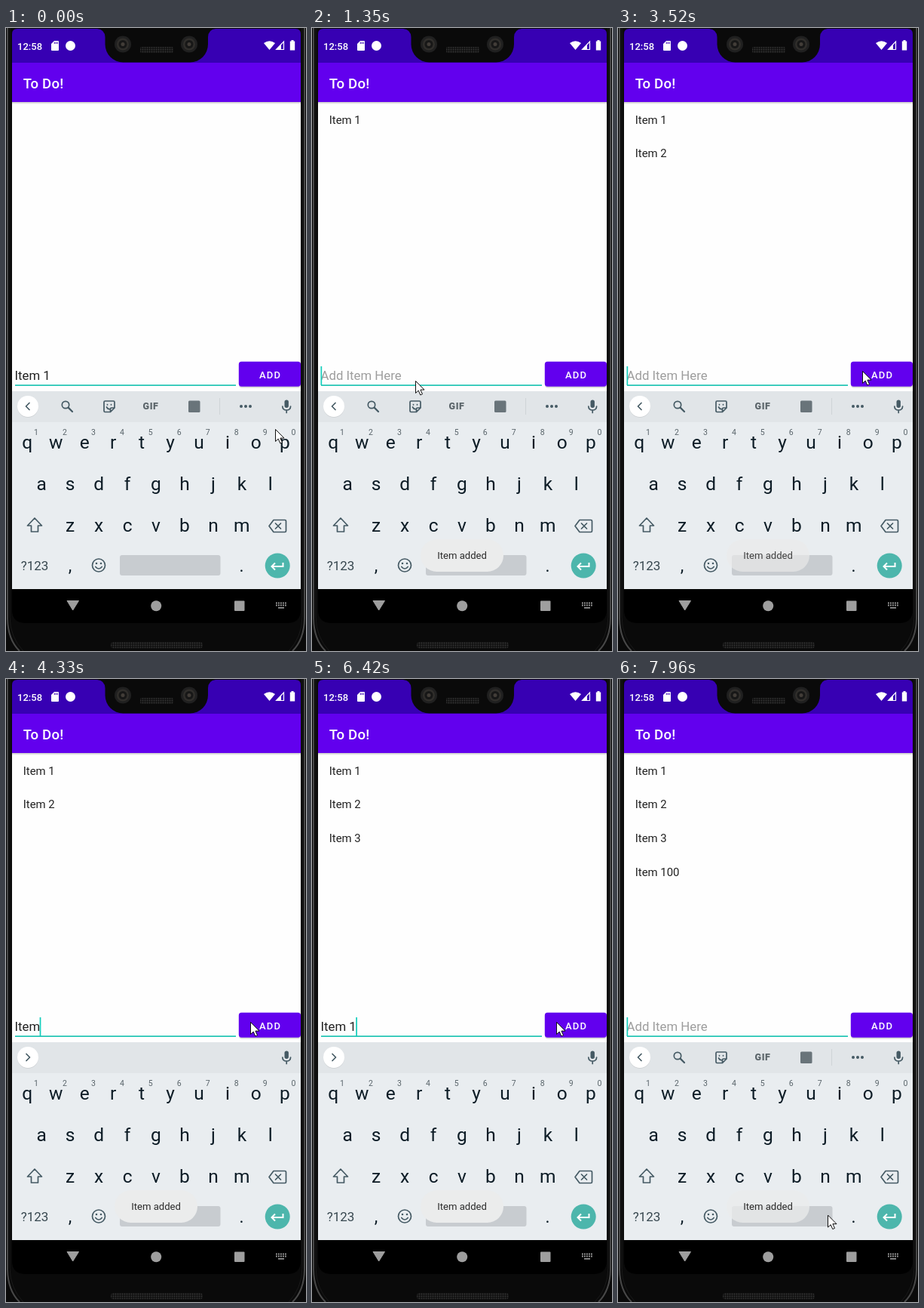
These frames come from a looping animation (398 px wide and 825 px high, 8000 ms). An HTML page:

```html
<!DOCTYPE html>
<html lang="en">
<head>
<meta charset="utf-8">
<title>To Do</title>
<style>
html, body { margin: 0; width: 100%; height: 100%; overflow: hidden; background: #0a0a0a; }
svg { display: block; width: 100%; height: 100%; }
text { font-family: Roboto, sans-serif; }
.mid { text-anchor: middle; }
.line { fill: none; stroke: #455a64; stroke-width: 1.7; stroke-linejoin: round; stroke-linecap: round; }
</style>
</head>
<body>
<svg viewBox="0 0 398 825">
  <defs>
    <linearGradient id="fade" x2="0" y2="1">
      <stop stop-color="#000" stop-opacity=".22"/><stop offset="1" stop-color="#000" stop-opacity="0"/>
    </linearGradient>
    <pattern id="mesh" width="3" height="3" patternUnits="userSpaceOnUse">
      <rect width="3" height="3" fill="#111"/><circle cx="1.5" cy="1.5" r=".9" fill="#333"/>
    </pattern>
  </defs>

  <!-- phone body -->
  <rect width="398" height="825" fill="#0a0a0a"/>
  <path d="M2 0V782Q2.500 810 18 825M396 0V782Q395.500 810 380 825" fill="none" stroke="#484848" stroke-width="2"/>
  <path d="M5 0V780Q5.500 807 23 825M393 0V780Q392.500 807 375 825" fill="none" stroke="#1a1a1a"/>
  <rect x="139" y="813" width="122" height="8.500" rx="4" fill="url(#mesh)"/>
  <path d="M8 743H391V770Q391 788 373 788H26Q8 788 8 770Z" fill="#000"/>

  <!-- app -->
  <rect x="8" y="98" width="383" height="384" fill="#fefefe"/>
  <path d="M8 47V8Q8 1 15 1H384Q391 1 391 8V47Z" fill="#3700b3"/>
  <rect x="8" y="46" width="383" height="52" fill="#6200ee"/>
  <rect x="8" y="98" width="383" height="3" fill="url(#fade)"/>
  <path d="M121 0V1Q131 2 131.500 12V21.500A24 24 0 0 0 155.500 45.500H244A24 24 0 0 0 268 21.500V12Q268.500 2 278 1V0Z" fill="#0a0a0a"/>
  <g id="lenses"></g>
  <rect x="178" y="25" width="44" height="8" rx="2" fill="url(#mesh)"/>
  <text x="15" y="28.500" font-size="13.030" font-weight="500" fill="#fff">12:58</text>
  <g fill="#fff">
    <path d="M64 17H69Q70 17 70 18V29Q70 30 69 30H61Q60 30 60 29V21Z"/>
    <path d="M64.300 18.500V21M66.300 18.500V21M68.300 18.500V21" stroke="#3700b3" stroke-width="1"/>
    <circle cx="85.500" cy="23.500" r="6.500"/>
    <path d="M342 20Q349.500 14.500 357 20L349.500 29Z"/>
    <path d="M368.500 18V28.500H358.500Z" fill="none" stroke="#fff" stroke-width="1.200"/>
    <path d="M365 21.500V29H358Z"/>
    <path d="M378.500 17.500V16H381.500V17.500H383.200V29.500H376.800V17.500Z"/>
  </g>
  <text x="22.800" y="79.500" font-size="18.600" font-weight="500" letter-spacing=".23" fill="#fff">To Do!</text>
  <g id="list"></g>
  <rect x="12" y="472.300" width="293" height="1.700" fill="#20c5b4"/>
  <text id="field" x="11.500" y="466" font-size="16.800"></text>
  <rect id="caret" y="448" width="1.700" height="25" fill="#12cdbb"/>
  <rect x="309" y="443.500" width="82" height="33" rx="4" fill="#000" opacity=".16"/>
  <rect x="308.800" y="441.800" width="82.200" height="33" rx="3.700" fill="#6200ee"/>
  <rect id="ripple" x="308.800" y="441.800" width="82.200" height="33" rx="3.700" fill="#fff"/>
  <text x="336" y="463.700" font-size="13.030" font-weight="500" letter-spacing="1.160" fill="#fff">ADD</text>

  <!-- keyboard -->
  <rect x="8" y="481" width="383" height="262" fill="#e9edf0"/>
  <rect x="8" y="481" width="383" height="41" fill="#e1e5e8"/>
  <circle cx="29" cy="501.800" r="14" fill="#000" opacity=".1"/>
  <circle cx="29" cy="501" r="14" fill="#fff"/>
  <path id="chevron" class="line" d="M31 496.500L26.500 501L31 505.500"/>
  <g id="tools">
    <g class="line">
      <circle cx="79" cy="499" r="4.700"/><path d="M82.600 502.600L88 508" stroke-width="2.200"/>
      <path d="M131.500 494H142.500Q144 494 144 495.500V503L138.500 508.500H131.500Q130 508.500 130 507V495.500Q130 494 131.500 494ZM144 503H140Q138.500 503 138.500 504.500V508.500M133.500 502Q135 505 137.500 504.500M134.500 498.500V499M139.500 498.500V499"/>
    </g>
    <text class="mid" x="192" y="505.200" font-size="12.500" font-weight="900" letter-spacing=".6" fill="#5a6469">GIF</text>
    <rect x="242" y="493.500" width="15.500" height="15.500" rx="1.500" fill="#69747a"/>
    <rect x="283" y="490" width="1" height="22" fill="#cfd4d7"/>
    <path d="M312 501h0M318 501h0M324 501h0" class="line" style="stroke-width:4"/>
  </g>
  <rect x="369.500" y="492.500" width="5.400" height="10.500" rx="2.700" fill="#455a64"/>
  <path class="line" d="M366.800 501Q367 506 372.200 506T377.600 501M372.200 506V509.500"/>
  <g id="keys" fill="#0d1c26"></g>
  <g class="line">
    <path d="M38 649L47.500 659H42.500V667H33.500V659H28.500Z"/>
    <path d="M355 651.500H370Q371.500 651.500 371.500 653V666Q371.500 667.500 370 667.500H355L349 659.500Z M357.500 656L364.500 663M364.500 656L357.500 663"/>
    <circle cx="123" cy="711.500" r="8.500"/>
    <path d="M118.800 713.500Q123 718.500 127.200 713.500"/>
    <path d="M120 709h0M126 709h0" stroke-width="2.600"/>
  </g>
  <text class="mid" x="38" y="718" font-size="17" fill="#37474f">?123</text>
  <rect x="151" y="698" width="133.500" height="27" rx="3" fill="#c8ccd0"/>
  <circle cx="360.200" cy="712" r="16.500" fill="#4db6ac"/>
  <path d="M367.500 708V713H353M357 708.500L352.500 713L357 717.500" fill="none" stroke="#fff" stroke-width="2"/>

  <!-- navigation bar -->
  <g fill="#9e9e9e">
    <path d="M81 758.500H96.500L88.700 771Z" stroke="#9e9e9e" stroke-linejoin="round"/>
    <circle cx="199.200" cy="765.300" r="7"/>
    <rect x="303" y="758.500" width="13.500" height="13.500" rx="1"/>
    <path d="M358 761.500H372M358 764.500H372" stroke="#9e9e9e" stroke-width="1.800" stroke-dasharray="1.800 1.200"/>
    <path d="M361 767.800H369" stroke="#9e9e9e" stroke-width="1.600"/>
  </g>

  <rect id="toast" x="144" y="677" width="110" height="43" rx="21.500" fill="#ebecec"/>
  <text id="note" class="mid" x="199" y="703" font-size="13.100" fill="#2b2b2b">Item added</text>
  <path id="pointer" d="M.5 .5V16.500L4.200 13.100L6.800 19L9.500 17.800L6.900 12.100H12Z" fill="#fff" stroke="#111" stroke-linejoin="round"/>
</svg>
<script>
const LOOP = 8000;
const $ = id => document.getElementById(id);

function add(parent, tag, attrs, content = '') {
  const el = document.createElementNS('http://www.w3.org/2000/svg', tag);
  for (const k in attrs) el.setAttribute(k, attrs[k]);
  el.textContent = content;
  return $(parent).appendChild(el);
}

for (const cx of [155, 243])
  [[11, '#202020'], [8, '#302e2b'], [5.5, '#171717'], [2.5, '#423d38']]
    .forEach(([r, fill]) => add('lenses', 'circle', { cx, cy: 21.5, r, fill }));

// every letter row is centred on the same axis
const AXIS = 199, KEY = 37.95;
['qwertyuiop', 'asdfghjkl', 'zxcvbnm'].forEach((row, r) =>
  [...row].forEach((ch, i) => {
    const x = AXIS + (i - (row.length - 1) / 2) * KEY;
    add('keys', 'text', { class: 'mid', x, y: 557 + r * 55, 'font-size': 24.5 }, ch);
    if (!r) add('keys', 'text', { class: 'mid', x: x + 11.8, y: 538.5, 'font-size': 10.5, fill: '#59646a' }, (i + 1) % 10);
  }));
for (const [ch, x] of [[',', 85], ['.', 312.5]])
  add('keys', 'text', { class: 'mid', x, y: 719.5, 'font-size': 23 }, ch);

// moments at which each list row appears
const added = [520, 3390, 5070, 7550];
const rows = ['Item 1', 'Item 2', 'Item 3', 'Item 100'].map((s, i) =>
  add('list', 'text', { x: 22.8, y: 126.5 + i * 44.8, 'font-size': 14.9, fill: '#222' }, s));

// bursts of screen updates: start, end, number of updates
const bursts = [
  [120, 1050, 8], [1200, 1350, 2], [1780, 2740, 7], [2860, 3790, 8], [3910, 4480, 5],
  [4910, 5570, 5], [5870, 6140, 3], [6420, 6870, 4], [7270, 7960, 6]
];
const ticks = [0];
for (const [a, b, n] of bursts)
  for (let i = 0; i < n; i++) ticks.push(Math.round((a + (b - a) * i / (n - 1)) / 10) * 10);

// time, field text, toolbar open, caret shown
const typing = [
  [0, 'Item 1', 1, 0], [520, '', 1, 1], [1200, '', 1, 0], [1350, '', 1, 1],
  [1780, 'I', 0, 1], [1940, 'Ite', 0, 1], [2100, 'Item ', 0, 1], [2260, 'Item 2', 0, 1], [2420, 'Item 2', 1, 0],
  [3390, '', 1, 1],
  [3910, 'I', 0, 1], [4050, 'Ite', 0, 1], [4190, 'Item ', 0, 1], [4330, 'Item 3', 0, 1], [4480, 'Item 3', 1, 0],
  [5070, '', 1, 1],
  [5870, 'I', 0, 1], [6000, 'Ite', 0, 1], [6140, 'Item', 0, 1],
  [6420, 'Item 1', 0, 1], [6570, 'Item 10', 0, 1], [6720, 'Item 100', 0, 1], [6870, 'Item 100', 1, 0],
  [7550, '', 1, 1]
];
const path = [
  [0, 357, 531], [390, 324, 457], [780, 324, 457], [1050, 135, 471], [1200, 137, 467],
  [2420, 137, 467], [2740, 205, 437], [2990, 324, 454], [7550, 324, 454], [7960, 278, 709.5]
];
// time, note opacity, bubble opacity
const fades = [
  [0, 0, 0], [520, 0, 0], [920, 1, .8], [1050, 1, 1], [2100, 1, 1], [2740, .27, .2], [2990, 0, 0],
  [3260, 0, 0], [3520, .88, .65], [3790, 1, 1], [7270, 1, 1], [7550, .3, .2], [7960, 1, .75]
];
const presses = [[390, 780], [2990, 3390], [4910, 5400], [7270, 7680]];

const last = (list, t, at = v => v[0]) => list.filter(v => at(v) <= t).pop();

function mix(keys, t) {
  const a = last(keys, t), b = keys[keys.indexOf(a) + 1] || a;
  const k = a === b ? 0 : (t - a[0]) / (b[0] - a[0]);
  return a.slice(1).map((v, i) => v + (b[i + 1] - v) * k);
}

function draw(now) {
  const t = last(ticks, now, v => v);
  const [, value, open, caret] = last(typing, t);
  const field = $('field');
  field.textContent = value || 'Add Item Here';
  field.setAttribute('fill', value ? '#222' : '#9d9d9d');
  $('caret').setAttribute('x', value ? 11 + field.getComputedTextLength() : 11.5);
  $('caret').setAttribute('opacity', caret);
  $('tools').setAttribute('opacity', open);
  $('chevron').setAttribute('transform', open ? '' : 'rotate(180 29 501)');
  rows.forEach((row, i) => row.setAttribute('opacity', t >= added[i] ? 1 : 0));
  $('ripple').setAttribute('opacity', presses.some(([a, b]) => t >= a && t < b) ? .14 : 0);
  const [note, bubble] = mix(fades, t);
  $('note').setAttribute('opacity', note);
  $('toast').setAttribute('opacity', bubble);
  $('pointer').setAttribute('transform', `translate(${mix(path, t)})`);
}

(function frame() {
  draw(performance.now() % LOOP);
  requestAnimationFrame(frame);
})();
</script>
</body>
</html>
```
